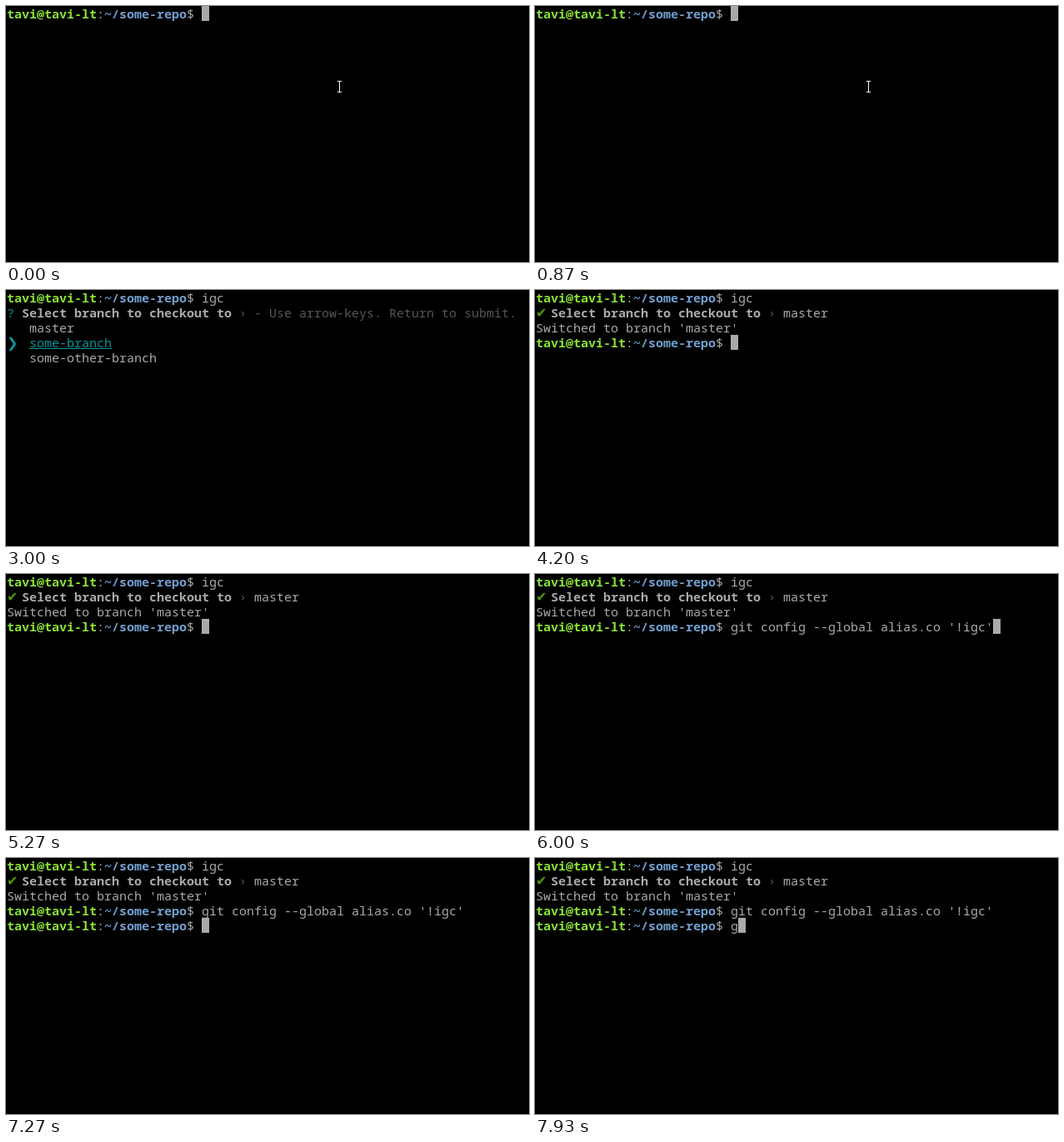
An HTML page with a canvas for the animation above (8000 ms loop, 628 by 308 pixels).

```html
<!DOCTYPE html>
<html lang="en">
<head>
<meta charset="utf-8">
<title>Terminal session</title>
<style>
html, body { margin: 0; width: 100%; height: 100%; overflow: hidden; background: #000; }
canvas { display: block; }
</style>
</head>
<body>
<canvas id="stage" width="628" height="308"></canvas>
<script>
const ctx = document.getElementById('stage').getContext('2d');
const LOOP = 8000, CELL = 9, LINE = 18, LEFT = 1, BASE = 15;
const MONO = '15px "Noto Sans Mono", "DejaVu Sans Mono", monospace';
const SYMBOL = '16px "DejaVu Sans", sans-serif';
const GREY = '#aaaaaa', DIM = '#555753', CYAN = '#06989a';
const GREEN = '#4e9a06', LIME = '#8ae234', BLUE = '#729fcf';

const USER = 'tavi@tavi-lt', PATH = '~/some-repo';
const PROMPT_END = USER.length + PATH.length + 3;
const BRANCHES = ['master', 'some-branch', 'some-other-branch'];
const CONFIG = "git config --global alias.co '!igc'";

// Moments at which the session changes, in ms
const AT = {
  keys: [1330, 1730, 1870], run: 2130, menu: 2400, up1: 3000, up2: 3270,
  pick: 3670, done: 3800, paste: 6000, enter: 6530, prompt: 6730, next: 7800
};

const xOf = col => LEFT + col * CELL;

function text(str, col, row, color = GREY, bold = false) {
  ctx.font = (bold ? 'bold ' : '') + MONO;
  ctx.fillStyle = color;
  ctx.fillText(str, xOf(col), row * LINE + BASE);
}

function symbol(char, row, color, bold = false) {
  ctx.font = (bold ? 'bold ' : '') + SYMBOL;
  ctx.fillStyle = color;
  ctx.fillText(char, LEFT, row * LINE + BASE);
}

function cursor(col, row) {
  ctx.fillStyle = GREY;
  ctx.fillRect(xOf(col), row * LINE, CELL, LINE);
}

function prompt(row, command, active) {
  text(USER, 0, row, LIME, true);
  text(':', USER.length, row);
  text(PATH, USER.length + 1, row, BLUE, true);
  text('$', PROMPT_END - 2, row);
  text(command, PROMPT_END, row);
  if (active) cursor(PROMPT_END + command.length, row);
}

function pointer() {
  ctx.fillStyle = '#fff';
  ctx.fillRect(400, 91, 1, 12);
  ctx.fillRect(398, 90, 5, 1);
  ctx.fillRect(398, 103, 5, 1);
}

function question() {
  text('Select branch to checkout to', 2, 1, GREY, true);
  text('›', 31, 1, DIM);
}

function menu(selected) {
  text('?', 0, 1, CYAN);
  question();
  text('- Use arrow-keys. Return to submit.', 33, 1, DIM);
  BRANCHES.forEach((name, i) => {
    const row = i + 2, on = i === selected;
    text(name, 3, row, on ? CYAN : GREY);
    if (!on) return;
    ctx.fillRect(xOf(3), row * LINE + 16, name.length * CELL, 1);
    symbol('❯', row, CYAN, true);
  });
}

function draw(t) {
  ctx.fillStyle = '#000';
  ctx.fillRect(0, 0, 628, 308);

  const typed = AT.keys.filter(k => t >= k).length;
  prompt(0, 'igc'.slice(0, typed), t < AT.run);
  if (t < AT.keys[0]) pointer();
  if (t < AT.run) return;
  if (t < AT.menu) return cursor(0, 1);
  if (t < AT.pick) return menu(t < AT.up1 ? 2 : t < AT.up2 ? 1 : 0);

  symbol('✔', 1, GREEN);
  question();
  text('master', 33, 1);
  if (t < AT.done) return cursor(0, 2);

  text("Switched to branch 'master'", 0, 2);
  prompt(3, t < AT.paste ? '' : CONFIG, t < AT.enter);
  if (t >= AT.prompt) prompt(4, t < AT.next ? '' : 'g', true);
}

const start = performance.now();
function frame() {
  draw((performance.now() - start) % LOOP);
  requestAnimationFrame(frame);
}
frame();
</script>
</body>
</html>
```
